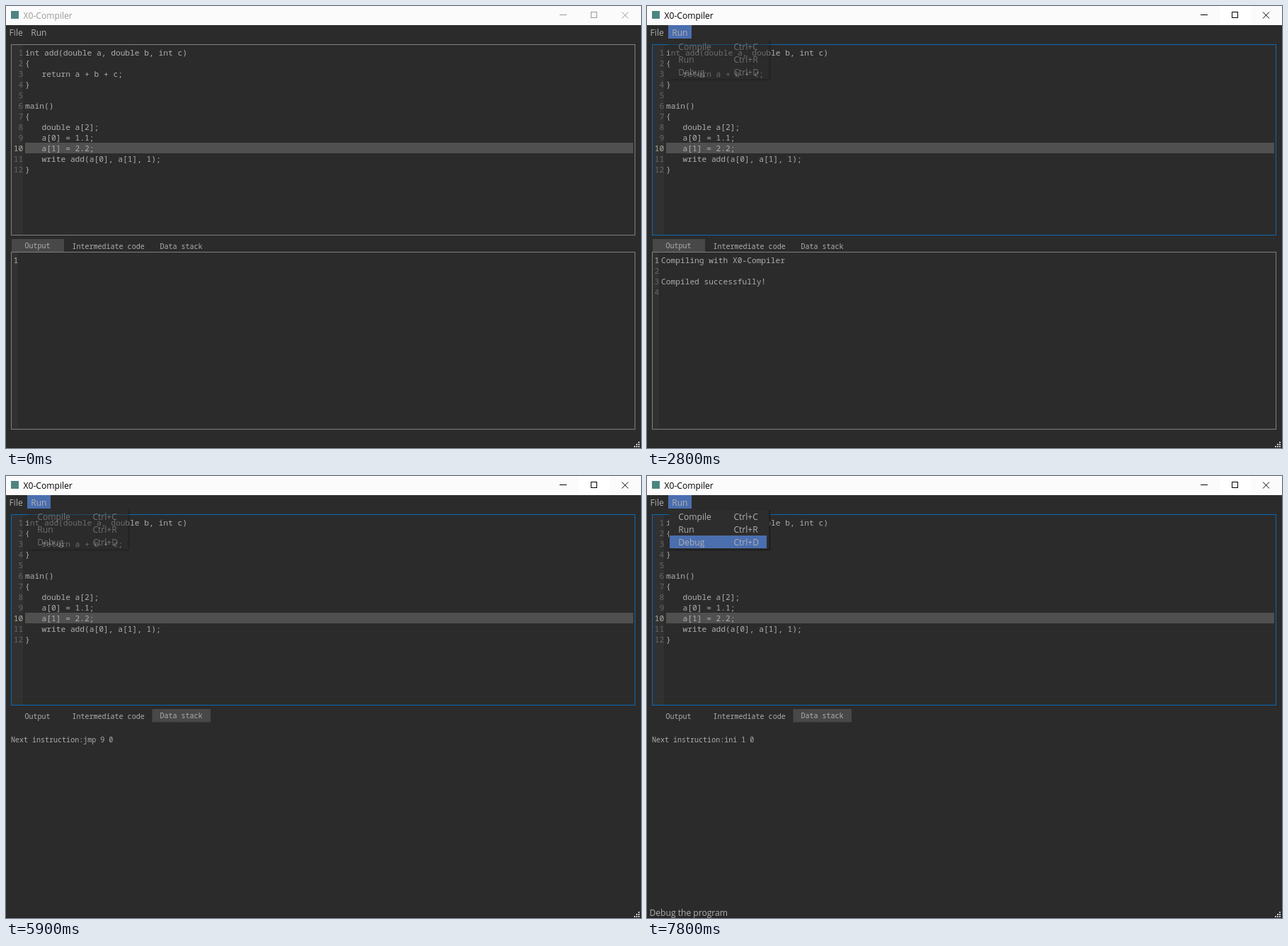
An HTML page for the animation above (8000 ms loop, 897 px wide and 624 px high).

```html
<!DOCTYPE html>
<html lang="en">
<head>
<meta charset="utf-8">
<title>X0-Compiler</title>
<style>
html, body { margin: 0; width: 100%; height: 100%; overflow: hidden; background: #2b2b2b; }
svg { display: block; width: 897px; height: 624px; }
text { white-space: pre; }
.ui { font: 12.1px "Open Sans", "Noto Sans", sans-serif; fill: #b0b0b0; }
.code { font: 11.23px "Noto Sans Mono", monospace; fill: #adadad; }
.small { font: 10.03px "Noto Sans Mono", monospace; fill: #adadad; }
.num { fill: #666; text-anchor: end; }
.now { fill: #b0aca4; }
.line { fill: none; stroke: #808080; }
.blue { fill: #4b6eaf; }

/* 1% of the loop is 80 ms; every change is a hard cut */
.title, .min, .max, .maxbg, .close, .red, .edit, .run, .menu, .caret,
.compile, .go, .debug, .output, .done, .ran, .stack {
  animation: 8s step-end infinite;
}
.title { animation-name: ink; }
.min { animation-name: glyph; }
.max { animation-name: max; }
.maxbg { animation-name: maxbg; }
.close { animation-name: close; }
.red { animation-name: red; }
.edit { animation-name: focus; }
.run { animation-name: run; }
.menu { animation-name: menu; filter: drop-shadow(1px 1px 1px #111); }
.caret { animation-name: caret; }
.compile { animation-name: compile; }
.go { animation-name: go; }
.debug { animation-name: debug; }
.output { animation-name: output; }
.done { animation-name: done; }
.ran { animation-name: ran; }
.stack { animation-name: stack; }

@keyframes ink { 0% { fill: #999; } 10% { fill: #000; } }
@keyframes glyph { 0% { stroke: #999; } 10% { stroke: #000; } }
@keyframes max { 0% { stroke: #999; } 2.5% { stroke: #000; } }
@keyframes maxbg { 0% { opacity: 0; } 2.5% { opacity: 1; } }
@keyframes close { 0%, 2.5% { stroke: #999; } 1.25% { stroke: #fff; } 10% { stroke: #000; } }
@keyframes red { 0%, 2.5% { opacity: 0; } 1.25% { opacity: 1; } }
@keyframes focus { 0% { stroke: #808080; } 10% { stroke: #0c6ab2; } }
@keyframes run {
  0%, 23.75%, 45%, 82.5%, 88.75% { opacity: 0; }
  7.5%, 30%, 71.25%, 86.25%, 90% { opacity: 1; }
}
@keyframes menu {
  0%, 23.75%, 45%, 82.5% { opacity: 0; }
  10%, 35%, 73.75%, 93.75% { opacity: .52; }
  11.25%, 36.25% { opacity: .88; }
  12.5%, 37.5%, 75%, 95% { opacity: 1; }
}
@keyframes caret {
  0%, 30%, 35%, 51.25%, 63.75%, 73.75%, 88.75% { opacity: 0; }
  23.75%, 45%, 57.5%, 70%, 82.5% { opacity: 1; }
}
@keyframes compile {
  0%, 23.75%, 76.25%, 96.25% { opacity: 0; }
  12.5%, 75%, 95% { opacity: 1; }
}
@keyframes go { 0%, 45%, 97.5% { opacity: 0; } 38.75%, 96.25% { opacity: 1; } }
@keyframes debug { 0%, 82.5% { opacity: 0; } 76.25%, 97.5% { opacity: 1; } }
@keyframes output { 0% { opacity: 1; } 61.25% { opacity: 0; } }
@keyframes done { 0% { opacity: 0; } 25% { opacity: 1; } }
@keyframes ran { 0% { opacity: 0; } 45% { opacity: 1; } }
@keyframes stack { 0% { opacity: 0; } 61.25% { opacity: 1; } }
</style>
</head>
<body>
<svg viewBox="0 0 897 624">
  <rect width="897" height="624" fill="#2b2b2b"/>
  <rect y="623" width="897" height="1" fill="#222"/>

  <!-- title bar -->
  <rect width="897" height="27" fill="#fbfbfb"/>
  <rect class="maxbg" x="809" width="44" height="27" fill="#fff"/>
  <rect class="red" x="853" width="44" height="26" fill="#e81123"/>
  <rect x="7" y="7" width="11" height="11" fill="#4f8580"/>
  <text class="ui title" x="24.5" y="17.5">X0-Compiler</text>
  <path class="min" d="M782 12.5h10" fill="none"/>
  <rect class="max" x="826.5" y="8.5" width="8" height="8" fill="none"/>
  <path class="close" d="M870 8.5l9 9m0-9l-9 9" fill="none"/>

  <!-- menu bar -->
  <rect class="run blue" x="30" y="27" width="33" height="19"/>
  <g class="ui">
    <text x="4.6" y="41.5">File</text>
    <text x="35.2" y="41.5">Run</text>
  </g>

  <!-- editor -->
  <rect x="8" y="55" width="16" height="268" fill="#313131"/>
  <rect x="27" y="193" width="859" height="15" fill="#505050"/>
  <rect class="line edit" x="7.5" y="54.5" width="881" height="269"/>
  <g class="code">
    <g class="num">
      <text x="24.3" y="70">1</text>
      <text x="24.3" y="85">2</text>
      <text x="24.3" y="100">3</text>
      <text x="24.3" y="115">4</text>
      <text x="24.3" y="130">5</text>
      <text x="24.3" y="145">6</text>
      <text x="24.3" y="160">7</text>
      <text x="24.3" y="175">8</text>
      <text x="24.3" y="190">9</text>
      <text class="now" x="24.3" y="205">10</text>
      <text x="24.3" y="220">11</text>
      <text x="24.3" y="235">12</text>
    </g>
    <text x="27" y="70">int add(double a, double b, int c)</text>
    <text x="27" y="85">{</text>
    <text x="50.5" y="100">return a + b + c;</text>
    <text x="27" y="115">}</text>
    <text x="27" y="145">main()</text>
    <text x="27" y="160">{</text>
    <text x="50.5" y="175">double a[2];</text>
    <text x="50.5" y="190">a[0] = 1.1;</text>
    <text x="50.5" y="205">a[1] = 2.2;</text>
    <text x="50.5" y="220">write add(a[0], a[1], 1);</text>
    <text x="27" y="235">}</text>
  </g>
  <rect class="caret" x="125" y="193" width="1" height="15" fill="#ddd"/>

  <!-- output page -->
  <g class="output">
    <rect x="8" y="329" width="74" height="19" fill="#484848"/>
    <rect x="8" y="348" width="9" height="249" fill="#313131"/>
    <rect class="line" x="7.5" y="347.5" width="881" height="250"/>
    <g class="small">
      <text x="26.5" y="342.3">Output</text>
      <text x="217.5" y="343">Data stack</text>
    </g>
    <g class="code">
      <text class="num now" x="17.2" y="363">1</text>
      <g class="done">
        <g class="num">
          <text x="17.2" y="378">2</text>
          <text x="17.2" y="393">3</text>
          <text x="17.2" y="408">4</text>
        </g>
        <text x="20" y="363">Compiling with X0-Compiler</text>
        <text x="20" y="393">Compiled successfully!</text>
      </g>
      <g class="ran">
        <text class="num" x="17.2" y="423">5</text>
        <text x="20" y="423">Output of your program:</text>
      </g>
    </g>
  </g>

  <!-- data stack page -->
  <g class="stack">
    <rect x="206.5" y="329" width="82.5" height="18.5" fill="#484848"/>
    <g class="small">
      <text x="26.5" y="343">Output</text>
      <text x="217.5" y="342.3">Data stack</text>
      <text x="7" y="376">Next instruction:</text>
      <g class="jmp"><text x="109.3" y="376">jmp 9 0</text></g>
      <g class="ini"><text x="109.3" y="376">ini 1 0</text></g>
    </g>
  </g>
  <style>
    .jmp, .ini { animation: 8s step-end infinite jmp; }
    .ini { animation-name: ini; }
    @keyframes jmp { 0% { opacity: 1; } 82.5% { opacity: 0; } }
    @keyframes ini { 0% { opacity: 0; } 82.5% { opacity: 1; } }
  </style>
  <text class="small" x="93.5" y="343">Intermediate code</text>

  <!-- run menu -->
  <g class="menu">
    <rect x="31" y="47" width="141.5" height="56.5" fill="#2d2d2d"/>
    <rect class="compile blue" x="32" y="48" width="137" height="18"/>
    <rect class="go blue" x="32" y="66" width="137" height="18"/>
    <rect class="debug blue" x="32" y="84" width="137" height="18"/>
    <g class="ui">
      <text x="44.3" y="61.5">Compile</text>
      <text x="122.4" y="61.5">Ctrl+C</text>
      <text x="44.3" y="79.5">Run</text>
      <text x="122.4" y="79.5">Ctrl+R</text>
      <text x="44.3" y="97.5">Debug</text>
      <text x="122.4" y="97.5">Ctrl+D</text>
    </g>
  </g>

  <!-- status bar -->
  <g class="ui">
    <text class="compile" x="3.5" y="620.5">Compile the program</text>
    <text class="go" x="3.5" y="620.5">Run the program</text>
    <text class="debug" x="3.5" y="620.5">Debug the program</text>
  </g>
  <path d="M893 615h2v2h-2zM890 618h2v2h-2zM893 618h2v2h-2zM887 621h2v2h-2zM890 621h2v2h-2zM893 621h2v2h-2z" fill="#c8c8c8"/>
</svg>
</body>
</html>
```
